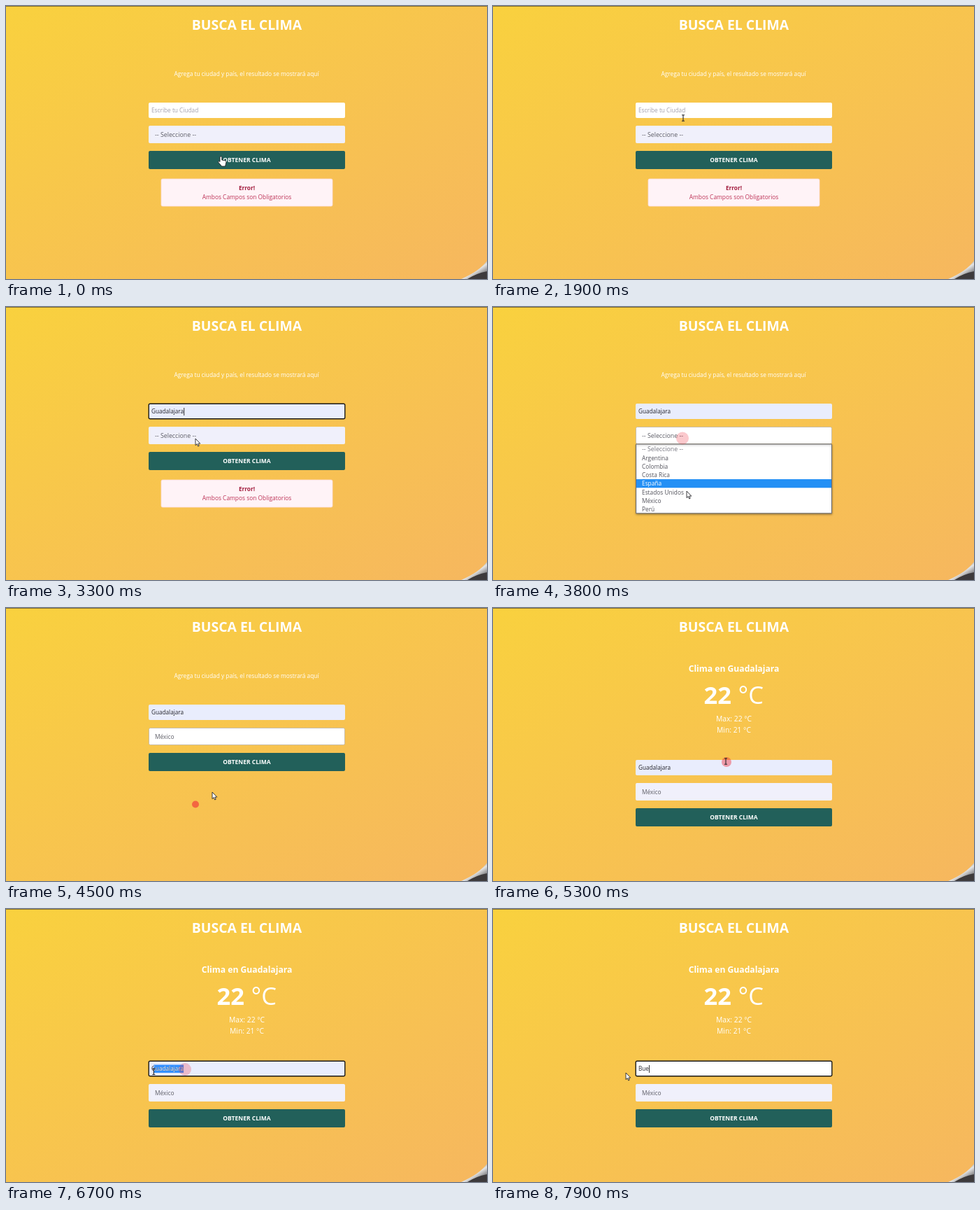
An HTML page with a canvas for the animation above (8 s loop, 688 px wide and 390 px high).

```html
<!DOCTYPE html>
<html lang="es">
<head>
<meta charset="utf-8">
<title>Busca el clima</title>
<style>
html, body { margin: 0; width: 100%; height: 100%; overflow: hidden; background: #f7c44d; }
canvas { display: block; width: 688px; height: 390px; }
</style>
</head>
<body>
<canvas id="stage" width="688" height="390"></canvas>
<script>
const W = 688, H = 390, LOOP = 8000, STEP = 100;
const LEFT = 204, WIDE = 281, MID = 344.5, SHIFT = 79;
const FONT = '"Open Sans", "Noto Sans", sans-serif';
const canvas = document.getElementById('stage');
const dpr = window.devicePixelRatio || 1;
canvas.width = W * dpr;
canvas.height = H * dpr;
const ctx = canvas.getContext('2d');
ctx.scale(dpr, dpr);

const COUNTRIES = ['-- Seleccione --', 'Argentina', 'Colombia', 'Costa Rica',
  'España', 'Estados Unidos', 'México', 'Perú'];

// Pointer waypoints: time, x, y
const PATH = [
  [0, 306, 215], [900, 306, 215], [1100, 348, 217], [1300, 358, 218],
  [1500, 358, 218], [1700, 312, 196], [1900, 272, 160], [2100, 271, 153],
  [2800, 271, 153], [3100, 271, 186], [3300, 271, 188], [3500, 271, 188],
  [3700, 275, 251], [3800, 277, 263], [4000, 274, 279], [4400, 271, 280],
  [4500, 295, 263], [4700, 324, 230], [4900, 333, 219], [5300, 333, 219],
  [5600, 354, 257], [5900, 356, 260], [6200, 300, 238], [6400, 256, 229],
  [6500, 254, 229], [6800, 190, 234], [8000, 190, 234]
];

// Click ripples: time, x, y
const CLICKS = [[2100, 271, 153], [3500, 271, 187.5], [4400, 271, 280.5],
  [5100, 334, 220], [6400, 256, 229]];

const ARROW = new Path2D('M0 0V9.6L2.2 7.6L3.7 11L5.2 10.3L3.8 7.1H6.8Z');
const HAND = new Path2D('M0 1.2C0 -.4 2.8 -.4 2.8 1.2V5L7.4 5.8' +
  'C8.8 6.2 9 7.2 8.8 8.6L7.6 14H2.6L-2 8.6C-3 7 -1.4 6 0 7.6Z');

function pointerAt(time) {
  const i = Math.max(1, PATH.findIndex(p => p[0] >= time));
  const [t0, x0, y0] = PATH[i - 1], [t1, x1, y1] = PATH[i];
  const k = Math.max(0, (time - t0) / (t1 - t0));
  return { x: x0 + (x1 - x0) * k, y: y0 + (y1 - y0) * k };
}

function text(str, x, y, size, color, weight = 400, align = 'left') {
  ctx.font = `${weight} ${size}px ${FONT}`;
  ctx.textAlign = align;
  ctx.fillStyle = color;
  ctx.fillText(str, x, y);
}

function box(x, y, w, h, fill, stroke, line = 1, r = 2) {
  ctx.beginPath();
  ctx.roundRect(x, y, w, h, r);
  ctx.fillStyle = fill;
  ctx.fill();
  if (!stroke) return;
  ctx.strokeStyle = stroke;
  ctx.lineWidth = line;
  ctx.stroke();
}

function background() {
  const g = ctx.createLinearGradient(177, -100, 511, 490);
  g.addColorStop(0, '#f9d13e');
  g.addColorStop(1, '#f6b75f');
  ctx.fillStyle = g;
  ctx.fillRect(0, 0, W, H);
  ctx.fillStyle = 'rgba(80,66,30,.65)';
  ctx.fillRect(0, 0, W, 1);
}

function pageCurl() {
  ctx.fillStyle = '#3d3a3c';
  ctx.beginPath();
  ctx.moveTo(658, H);
  ctx.lineTo(W, 376);
  ctx.lineTo(W, H);
  ctx.fill();
  const g = ctx.createLinearGradient(666, 372, 676, 388);
  g.addColorStop(0, '#8d8c88');
  g.addColorStop(.45, '#e4e4e4');
  g.addColorStop(1, '#77777a');
  ctx.fillStyle = g;
  ctx.beginPath();
  ctx.moveTo(651, H);
  ctx.quadraticCurveTo(677, 379, W, 364);
  ctx.lineTo(W, 379);
  ctx.quadraticCurveTo(672, 382, 660, H);
  ctx.fill();
}

function result() {
  text('Clima en Guadalajara', MID, 91, 12.15, '#fff', 700, 'center');
  text('22', 301.5, 137, 34.5, '#fff', 700);
  text('°C', 350.5, 137, 34.5, '#fff', 500);
  text('Max: 22 °C', MID, 161.5, 10.3, '#fff', 400, 'center');
  text('Min: 21 °C', MID, 178, 10.3, '#fff', 400, 'center');
}

function cityText(t) {
  if (t < 2500) return '';
  if (t < 2900) return 'Gua'.slice(0, 1 + Math.floor((t - 2500) / 100));
  if (t < 7300) return 'Guadalajara';
  return t < 7600 ? '' : t < 7900 ? 'B' : 'Bue';
}

function cityField(t, y) {
  const filled = t >= 2900 && t < 7300;
  const focus = (t >= 2100 && t < 3500) || t >= 6400;
  const value = cityText(t);
  box(LEFT, y, WIDE, 22, filled ? '#e9edfd' : '#fff');
  if (focus) box(LEFT + .2, y + .2, WIDE - .4, 21.6, 'transparent', '#191919', 1.4);
  ctx.font = `400 8.2px ${FONT}`;
  const end = 208 + ctx.measureText(value).width;
  const selecting = t >= 6500 && t < 7300;
  if (selecting) {
    const from = Math.max(208, Math.min(end, pointerAt(t).x));
    ctx.fillStyle = '#3390ff';
    ctx.fillRect(from, y + 5.5, end - from, 11.5);
    text(value, 208, y + 14.3, 8.2, '#25252c');
    ctx.save();
    ctx.beginPath();
    ctx.rect(from, y, end - from, 22);
    ctx.clip();
    text(value, 208, y + 14.3, 8.2, '#fff');
    ctx.restore();
  } else if (value) {
    text(value, 208, y + 14.3, 8.2, '#25252c');
  } else {
    text('Escribe tu Ciudad', 208, y + 14.3, 8.3, '#a3a1ad');
  }
  if (focus && !selecting) {
    ctx.fillStyle = '#222';
    ctx.fillRect(value ? end + .2 : 208, y + 6, .9, 11);
  }
}

function countryField(t, y) {
  const focus = t >= 3500 && t < 5100;
  if (focus) box(LEFT + .5, y + .5, WIDE - 1, 24, '#fff', '#bcb4a8', .8);
  else box(LEFT, y, WIDE, 25, '#f0f0fb');
  if (t < 4400) text(COUNTRIES[0], 213, y + 16.2, 8.8, '#5d5d66');
  else text('México', 213, y + 16.2, 8.4, '#5d5d66');
}

function options(t) {
  const top = 196.8, row = 12.3;
  ctx.save();
  ctx.shadowColor = 'rgba(0,0,0,.35)';
  ctx.shadowBlur = 3;
  ctx.shadowOffsetY = 1;
  box(LEFT + .5, 196, WIDE - 1, 98.8, '#fff', '#6d6d70', 1, 0);
  ctx.restore();
  const over = Math.floor((pointerAt(t - STEP).y - top) / row);
  const active = Math.max(0, Math.min(7, over));
  ctx.fillStyle = '#2490f5';
  ctx.fillRect(LEFT + 1, top + active * row, WIDE - 2, row);
  COUNTRIES.forEach((name, i) => {
    const color = i === active ? '#fff' : i ? '#52525b' : '#777780';
    text(name, 213, 206.2 + i * row, i ? 8.35 : 8.8, color);
  });
}

function errorBox() {
  box(222, 247, 245, 39, '#fff3f7', '#fbdcd8', .8);
  text('Error!', MID, 263, 8.2, '#a31f40', 700, 'center');
  text('Ambos Campos son Obligatorios', MID, 276.2, 8.4, '#bd3458', 400, 'center');
}

function ripples(t) {
  for (const [start, x, y] of CLICKS) {
    const k = (t - start) / 100;
    if (k < 0 || k > 4) continue;
    ctx.fillStyle = `rgba(240,40,55,${.775 - .175 * k})`;
    ctx.beginPath();
    ctx.arc(x, y, 3 + 2 * k, 0, Math.PI * 2);
    ctx.fill();
  }
}

function pointer(t, dy) {
  const { x, y } = pointerAt(t);
  const listOpen = t >= 3500 && t < 4400;
  const inside = x >= LEFT && x <= LEFT + WIDE && !listOpen;
  const within = (a, b) => inside && y >= a + dy && y <= b + dy;
  ctx.save();
  ctx.translate(x, y);
  ctx.strokeStyle = '#25252a';
  ctx.lineWidth = .9;
  if (within(138, 161)) {
    ctx.beginPath();
    ctx.moveTo(-2, -4.2);
    ctx.lineTo(2, -4.2);
    ctx.moveTo(0, -4.2);
    ctx.lineTo(0, 4.2);
    ctx.moveTo(-2, 4.2);
    ctx.lineTo(2, 4.2);
    ctx.lineWidth = 1.1;
    ctx.stroke();
  } else {
    const shape = within(207, 233) ? HAND : ARROW;
    ctx.fillStyle = '#fff';
    ctx.fill(shape);
    ctx.stroke(shape);
  }
  ctx.restore();
}

function draw(t) {
  const found = t >= 5300;
  const dy = found ? SHIFT : 0;
  background();
  text('BUSCA EL CLIMA', MID, 34, 19.4, '#fff', 700, 'center');
  if (found) result();
  else text('Agrega tu ciudad y país, el resultado se mostrará aquí', MID - .5, 100, 8.34, '#fff', 400, 'center');
  cityField(t, 138 + dy);
  countryField(t, 171 + dy);
  box(LEFT, 207 + dy, WIDE, 26, '#22605a');
  text('OBTENER CLIMA', MID, 223.3 + dy, 8.5, '#fff', 700, 'center');
  if (t < 4400) errorBox();
  if (t >= 3500 && t < 4400) options(t);
  pageCurl();
  ripples(t);
  pointer(t, dy);
}

const begin = performance.now();
function tick() {
  const t = (performance.now() - begin) % LOOP;
  draw(Math.floor(t / STEP) * STEP);
  requestAnimationFrame(tick);
}
tick();
</script>
</body>
</html>
```
